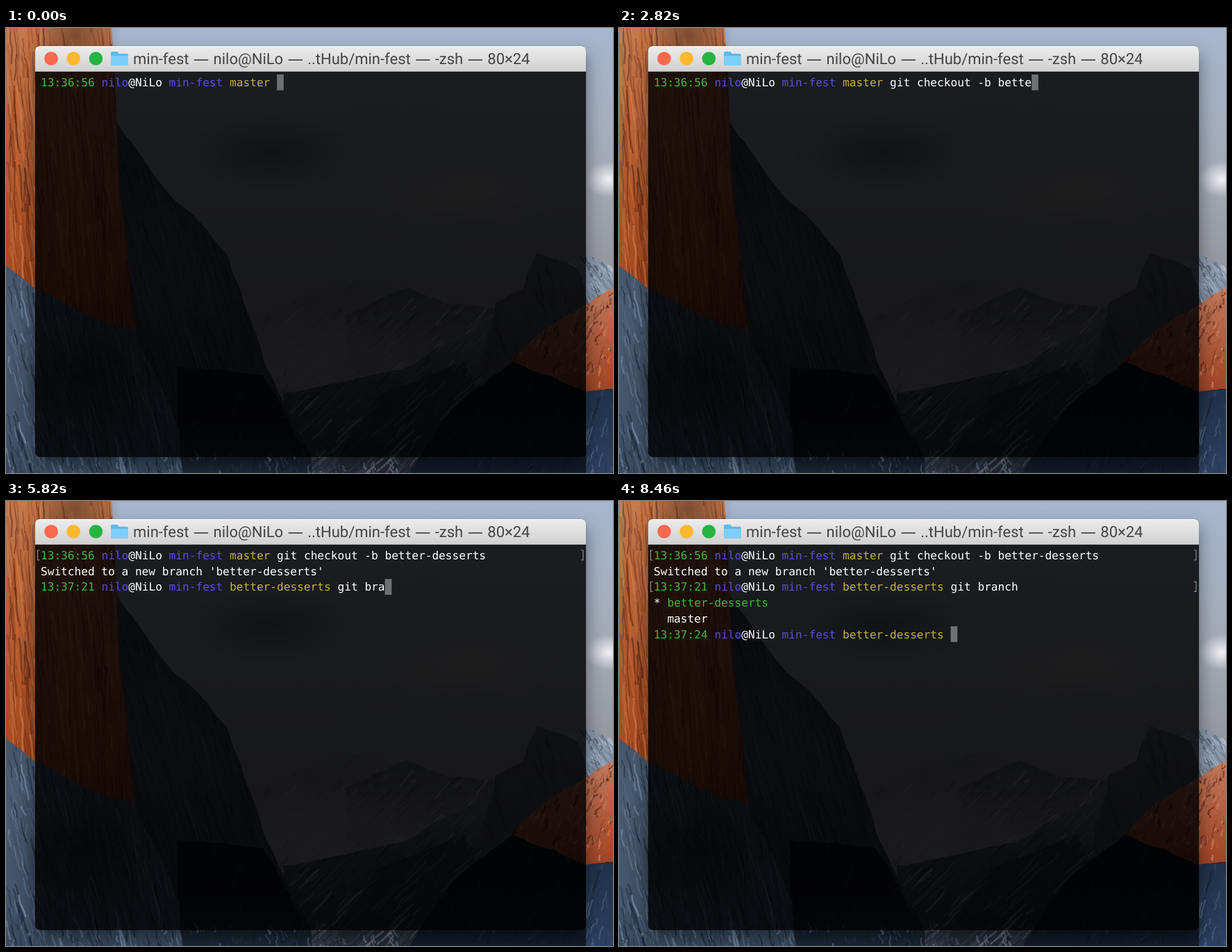
Animation of 874x641 px, one loop 8.52 s. Source, as an HTML page with a canvas:

```html
<!DOCTYPE html>
<html lang="en">
<head>
<meta charset="utf-8">
<title>Terminal</title>
<style>
  html, body { margin: 0; width: 100%; height: 100%; overflow: hidden; background: #222b38; }
  canvas, svg, #window { position: absolute; left: 0; top: 0; }
  #window {
    left: 42px; top: 26px; width: 793px; height: 592px; border-radius: 7px;
    background: rgba(0, 1, 2, .845);
    box-shadow: 0 12px 24px rgba(0, 0, 0, .45), 0 0 1px rgba(0, 0, 0, .6);
  }
  text { white-space: pre; text-rendering: geometricPrecision; }
  #title { font: 22px Roboto, Inter, sans-serif; fill: #444; word-spacing: .8px; }
  #title .dash { font-family: "Noto Sans", sans-serif; }
  #screen { font: 16.14px "DejaVu Sans Mono", "Noto Sans Mono", monospace; }
</style>
</head>
<body>
<canvas id="wallpaper" width="874" height="641"></canvas>
<div id="window"></div>
<svg width="874" height="641" viewBox="0 0 874 641">
  <defs>
    <linearGradient id="bar" x2="0" y2="1">
      <stop offset="0" stop-color="#ececec"/>
      <stop offset="1" stop-color="#d0d0d0"/>
    </linearGradient>
  </defs>
  <path d="M42 63V33q0-7 7-7H828q7 0 7 7V63Z" fill="url(#bar)"/>
  <path d="M48 26.5H829" stroke="#f7f7f7"/>
  <path d="M42 62.5H835" stroke="#a9a9a9"/>
  <g id="buttons"></g>
  <path d="M151 36q0-2 2-2h7l3 3h11q2 0 2 2v13q0 2-2 2H153q-2 0-2-2Z" fill="#5fb9ea"/>
  <path d="M151 40H176V52q0 2-2 2H153q-2 0-2-2Z" fill="#7ccffa"/>
  <text id="title" x="183" y="52"></text>
  <g id="screen"></g>
</svg>
<script>
const LOOP = 8520, STEP = 60, WIDTH = 874, HEIGHT = 641;
const USER = "nilo", HOST = "NiLo", BRANCH = "better-desserts";
const GREEN = "#43b83d", BLUE = "#584fd6", WHITE = "#fff", YELLOW = "#c3b23c", GREY = "#8d8e90";

// ---------- wallpaper ----------
const ctx = document.getElementById("wallpaper").getContext("2d");
let seed = 7;
const random = () => (seed = seed * 16807 % 2147483647) / 2147483647;
const between = (a, b) => a + (b - a) * random();

function vertical(y0, y1, colors) {
  const gradient = ctx.createLinearGradient(0, y0, 0, y1);
  colors.forEach((c, i) => gradient.addColorStop(i / (colors.length - 1), c));
  return gradient;
}

// Midpoint displacement turns a few key points into a natural skyline.
function roughen(points, roughness, depth = 4) {
  if (!depth) return points;
  const result = [points[0]];
  for (let i = 1; i < points.length; i++) {
    const [ax, ay] = points[i - 1], [bx, by] = points[i];
    const spread = roughness * Math.hypot(bx - ax, by - ay);
    result.push([(ax + bx) / 2 + between(-spread, spread), (ay + by) / 2 + between(-spread, spread)], [bx, by]);
  }
  return roughen(result, roughness, depth - 1);
}

// Short wandering strokes, alternating shade and light.
function grain(x0, y0, x1, y1, { density, length, lean, tones, alpha = .5 }) {
  const count = density * (x1 - x0) * (y1 - y0) / 1000;
  for (let i = 0; i < count; i++) {
    let x = between(x0, x1), y = between(y0 - length / 2, y1);
    const step = between(.2, 1) * length / 5;
    ctx.strokeStyle = tones[i % tones.length];
    ctx.globalAlpha = between(.2, 1) * alpha;
    ctx.lineWidth = between(.5, 3);
    ctx.beginPath();
    ctx.moveTo(x, y);
    for (let k = 0; k < 5; k++) {
      x += lean * step + between(-2, 2);
      y += step;
      ctx.lineTo(x, y);
    }
    ctx.stroke();
  }
  ctx.globalAlpha = 1;
}

// Land reaches from its skyline down to the bottom of the stage.
function land(skyline, colors, texture, roughness = .04) {
  const xs = skyline.map(p => p[0]), ys = skyline.map(p => p[1]);
  const left = Math.min(...xs), right = Math.max(...xs), top = Math.min(...ys);
  const outline = [[left, HEIGHT], ...roughen(skyline, roughness), [right, HEIGHT]];
  const path = new Path2D("M" + outline + "Z");
  ctx.save();
  ctx.fillStyle = vertical(top, HEIGHT, colors);
  ctx.fill(path);
  ctx.clip(path);
  grain(left, top, right, HEIGHT, texture);
  ctx.restore();
}

function glow(x, y, rx, ry, color, alpha) {
  ctx.save();
  ctx.translate(x, y);
  ctx.scale(rx, ry);
  ctx.globalAlpha = alpha;
  const gradient = ctx.createRadialGradient(0, 0, 0, 0, 0, 1);
  gradient.addColorStop(0, color);
  gradient.addColorStop(1, color + "00");
  ctx.fillStyle = gradient;
  ctx.fillRect(-1, -1, 2, 2);
  ctx.restore();
}

function paintSky() {
  ctx.fillStyle = vertical(0, 450, ["#a5b6ce", "#a5b0c2", "#a2a8b2", "#95989f", "#9c9aa6"]);
  ctx.fillRect(0, 0, WIDTH, HEIGHT);
  for (let i = 0; i < 14; i++) {
    glow(between(280, 640), between(100, 330), between(40, 110), between(12, 35), i % 2 ? "#8e9a9f" : "#b3aca6", .28);
  }
  glow(380, 180, 130, 55, "#4b6272", .65);
  glow(670, 235, 140, 50, "#cbbfb3", .5);
  glow(868, 218, 34, 26, "#fffcff", .85);
}

function paintWallpaper() {
  const snow = { density: 7, length: 26, lean: -1, tones: ["#e4e7f0", "#39404e"], alpha: .55 };
  const slope = { ...snow, length: 42, tones: ["#c8cddb", "#1c222d", "#646c7b"] };
  const wood = { density: 5, length: 16, lean: -.3, tones: ["#2c4260", "#0a0f18"], alpha: .45 };
  const wall = { density: 6, length: 95, lean: .3, tones: ["#10141d", "#697385", "#303745"] };
  const slate = { density: 9, length: 60, lean: .25, tones: ["#16202d", "#8ba2bd", "#3d4e64"], alpha: .65 };
  const sunlit = { density: 7, length: 100, lean: .08, tones: ["#4e1f10", "#e79a62", "#7d2f14", "#d2682f"], alpha: .6 };
  const ridge = { density: 18, length: 16, lean: -.4, tones: ["#e9a384", "#42180f", "#ad4826"], alpha: .7 };

  paintSky();
  land([[350, 425], [490, 363], [720, 410]], ["#8d8f9b", "#a29fad", "#757986"], { ...snow, density: 3, alpha: .3 });
  land([[490, 412], [577, 373], [640, 398], [720, 405]], ["#656a77", "#9c99a7", "#70747f"], snow);
  glow(490, 465, 160, 55, "#a3a0af", .75);
  land([[400, 525], [570, 492], [700, 425], [740, 460]], ["#757c8b", "#454c59", "#303744"], slope);
  land([[470, 641], [535, 530], [660, 480], [700, 560]], ["#363d49", "#242b36"], { ...slope, alpha: .35 });
  land([[800, 345], [835, 323], [874, 345]], ["#8c9cb0", "#56687f"], { ...snow, density: 20, lean: .6 });
  land([[684, 475], [705, 396], [745, 375], [764, 325], [824, 347], [840, 400]], ["#666a74", "#3c424e"],
    { ...wall, length: 50, alpha: .35 });
  land([[724, 482], [835, 399], [874, 374]], ["#c17a5c", "#a2492a", "#5e281b"], ridge);
  land([[580, 641], [640, 552], [728, 481], [835, 524], [874, 520]], ["#0b1018", "#131d2b"], wood);
  land([[835, 524], [874, 520]], ["#203149", "#2b4160"], { ...slate, length: 30, lean: -.2, alpha: .5 });
  land([[145, 110], [250, 254], [320, 330], [360, 440], [390, 520], [440, 620]], ["#3d434f", "#464e5c", "#2a313d"], wall);
  land([[246, 488], [370, 500], [440, 620]], ["#0d1118", "#10161f", "#1d2838"], wood);
  land([[0, 0], [152, 0], [163, 230], [186, 434], [255, 641]], ["#c47a4f", "#b15a2f", "#a34218", "#6f2a12"], sunlit, .008);
  land([[0, 342], [42, 376], [186, 436], [250, 580], [255, 641]], ["#46576c", "#4d6077", "#384a60"], slate);
  glow(120, 500, 130, 110, "#10161f", .65);
  glow(100, 10, 65, 60, "#361f16", .5);
  grain(0, 612, 590, HEIGHT, { ...slate, length: 16, density: 12, alpha: .5 });
}

// ---------- text ----------
const svgNS = "http://www.w3.org/2000/svg";
const byId = id => document.getElementById(id);
const screen = byId("screen");
const LEFT = 50, ADVANCE = 9.717, TOP = 67, LINE = 22.7;

function add(parent, tag, attributes, text = "") {
  const node = document.createElementNS(svgNS, tag);
  for (const key in attributes) node.setAttribute(key, attributes[key]);
  node.textContent = text;
  parent.append(node);
}

function drawTitleBar() {
  ["#fa694d", "#fdb82f", "#26b440"].forEach((fill, i) =>
    add(byId("buttons"), "circle", { cx: 65 + 32.2 * i, cy: 44, r: 9.8, fill }));
  ["min-fest", `${USER}@${HOST}`, "..tHub/min-fest", "-zsh", "80×24"].forEach((part, i) => {
    if (i) add(byId("title"), "tspan", { class: "dash" }, " — ");
    add(byId("title"), "tspan", {}, part);
  });
}

const prompt = (time, branch) => [
  [GREEN, time + " "], [BLUE, USER], [WHITE, `@${HOST} `], [BLUE, "min-fest "], [YELLOW, branch + " "]
];

// Each burst of typing runs at its own steady pace, in ms per character.
const CHECKOUT = {
  enter: 4440,
  bursts: [
    { text: "git checkout -", start: 240, pace: 108 },
    { text: "b " + BRANCH, start: 1800, pace: 135 }
  ]
};
const LIST = { enter: 6960, bursts: [{ text: "git branch", start: 5040, pace: 108 }] };

const typed = ({ bursts }, t) => [WHITE, bursts.map(({ text, start, pace }) =>
  text.slice(0, Math.max(0, Math.floor((t - start) / pace)))).join("")];

function linesAt(t) {
  const lines = [{ runs: [...prompt("13:36:56", "master"), typed(CHECKOUT, t)], entered: t >= CHECKOUT.enter }];
  if (t >= CHECKOUT.enter) {
    lines.push({ runs: [[WHITE, `Switched to a new branch '${BRANCH}'`]] },
      { runs: [...prompt("13:37:21", BRANCH), typed(LIST, t)], entered: t >= LIST.enter });
  }
  if (t >= LIST.enter) {
    lines.push({ runs: [[WHITE, "* "], [GREEN, BRANCH]] },
      { runs: [[WHITE, "  master"]] },
      { runs: prompt("13:37:24", BRANCH) });
  }
  return lines;
}

let shown = "";
function draw(t) {
  const lines = linesAt(t), state = JSON.stringify(lines);
  if (state === shown) return;
  shown = state;
  screen.replaceChildren();
  lines.forEach(({ runs, entered }, row) => {
    const top = TOP + row * LINE;
    let x = LEFT;
    for (const [fill, text] of runs) {
      add(screen, "text", { x, y: top + 17, fill }, text);
      x += text.length * ADVANCE;
    }
    if (entered) {
      const d = `M48.5 ${top + 4}h-3v14h3M828 ${top + 4}h3v14h-3`;
      add(screen, "path", { d, fill: "none", stroke: GREY, "stroke-width": 1.2 });
    }
    if (row === lines.length - 1) {
      add(screen, "rect", { x, y: top, width: ADVANCE, height: LINE, fill: "#6f7072" });
    }
  });
}

paintWallpaper();
drawTitleBar();

const start = performance.now();
function tick() {
  const t = (performance.now() - start) % LOOP;
  draw(Math.floor(t / STEP) * STEP);
  requestAnimationFrame(tick);
}
tick();
</script>
</body>
</html>
```
